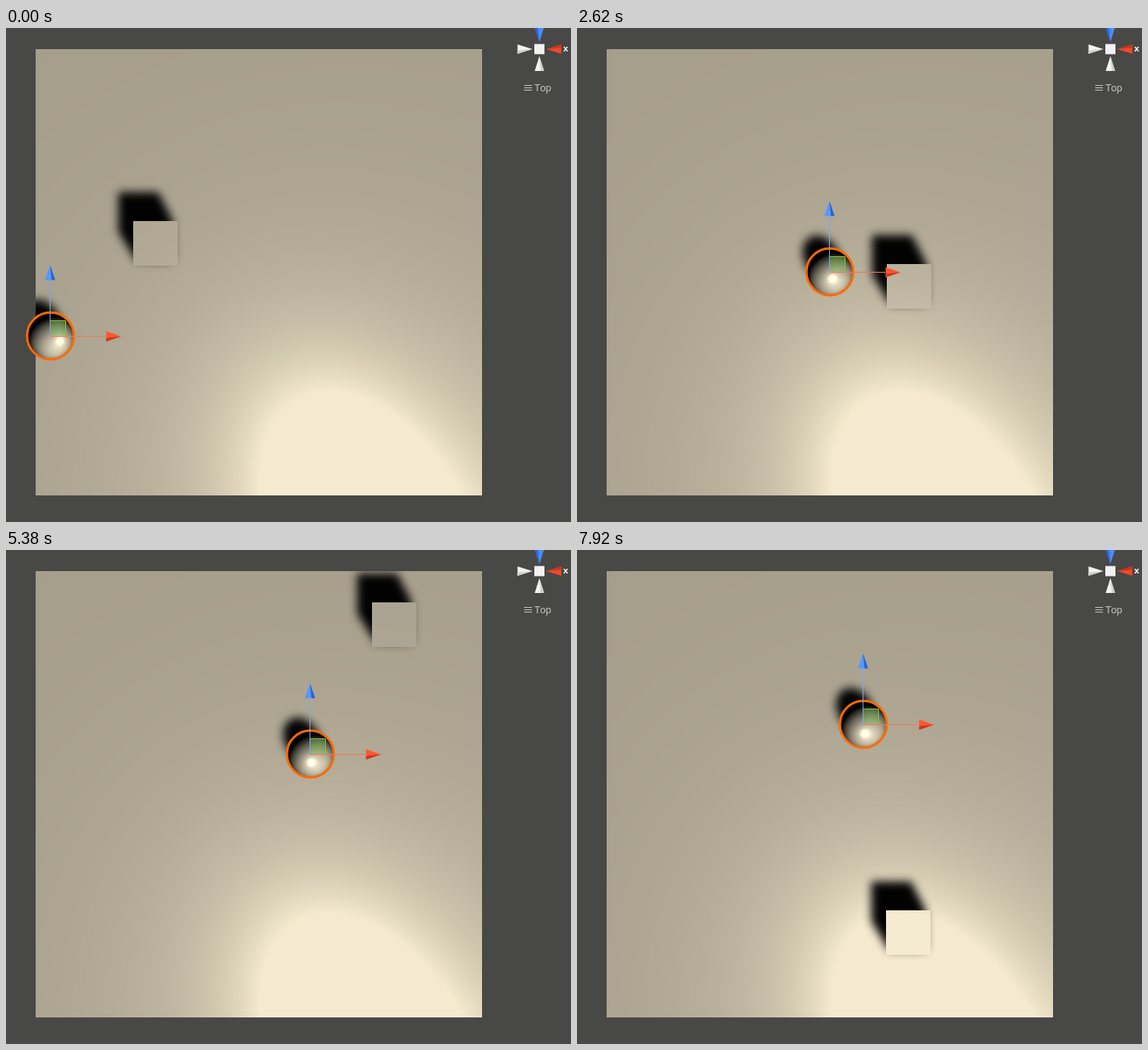
An HTML page with a canvas that plays this animation: 724x632 px, repeating every 8000 ms.

```html
<!DOCTYPE html>
<html lang="en">
<head>
<meta charset="utf-8">
<title>Rolling ball</title>
<style>
  html, body { margin: 0; width: 100%; height: 100%; overflow: hidden; background: #484846; }
  canvas { display: block; }
</style>
</head>
<body>
<canvas id="stage" width="724" height="632"></canvas>
<script>
const ctx = document.getElementById('stage').getContext('2d');
const LOOP = 8000, STEP = 76.9, LAST_STEP = 103;
const PLANE = { x: 38, y: 27, w: 572, h: 571 };
const CUBE = 57, RADIUS = 29;
const LIGHT = [0.321, 0.557, 0.766];          // screen x, screen y, towards the viewer
const EYE = { x: 280, y: 316, height: 420 };
const TINT = [1, 0.957, 0.843];
const AMBIENT = 159;

// Way points [step, x, y]; after each roll the ball has fallen off and is put back to the centre.
const ROLLS = [
  [[0, 57, 394], [8, 2, 400]],
  [[8, 324, 312], [13, 291, 343], [22, 160, 342], [26, 88, 323], [34, -18, 340]],
  [[34, 324, 312], [42, 344, 273], [51, 375, 241], [58, 363, 240], [69, 386, 262],
   [80, 445, 225], [89, 457, 148], [103, 367, 223], [104, 366, 230]]
];
// The cube jumps whenever it is reached or the ball falls: [step, left, top]
const JUMPS = [[0, 163, 247], [8, 199, 375], [14, 71, 190],
               [34, 397, 302], [69, 469, 67], [85, 396, 461]];

const clamp01 = v => Math.min(1, Math.max(0, v));
const dot = (a, b) => a.reduce((sum, c, i) => sum + c * b[i], 0);
const unit = v => v.map(c => c / Math.hypot(...v));

// Brightness with a highlight; k is the squared cosine between normal and half vector
const gloss = k => Math.min(245, AMBIENT + 2.85 / (1.013 - k));

function halfVector(x, y) {
  const view = unit([EYE.x - x, EYE.y - y, EYE.height]);
  return unit(view.map((c, i) => c + LIGHT[i]));
}

function makeLayer(w, h) {
  const canvas = document.createElement('canvas');
  Object.assign(canvas, { width: w, height: h });
  return canvas;
}

function paint(layer, brightness) {
  const { width: w, height: h } = layer, c = layer.getContext('2d');
  const image = c.createImageData(w, h);
  for (let i = 0; i < w * h; i++) {
    const value = brightness(i % w, Math.floor(i / w));
    if (value === null) continue;
    TINT.forEach((f, j) => image.data[i * 4 + j] = value * f);
    image.data[i * 4 + 3] = 255;
  }
  c.putImageData(image, 0, 0);
}

const ground = makeLayer(PLANE.w, PLANE.h);
paint(ground, (x, y) => gloss(halfVector(x + PLANE.x, y + PLANE.y)[2] ** 2));
const ball = makeLayer(60, 60);

// Smooth curve through the way points of the current roll
function ballAt(step) {
  const roll = ROLLS.find(r => step < r.at(-1)[0]);
  const i = roll.findIndex(p => p[0] > step) - 1;
  const a = roll[i], b = roll[i + 1], span = b[0] - a[0], u = (step - a[0]) / span;
  const slope = (n, axis) => {
    const p = roll[Math.max(0, n - 1)], q = roll[Math.min(roll.length - 1, n + 1)];
    return (q[axis] - p[axis]) / (q[0] - p[0]) * span;
  };
  return [1, 2].map(axis => Math.round(
    a[axis] * (1 + 2 * u) * (1 - u) ** 2 + slope(i, axis) * u * (1 - u) ** 2 +
    b[axis] * u * u * (3 - 2 * u) + slope(i + 1, axis) * u * u * (u - 1)));
}

function trace(points) {
  ctx.beginPath();
  points.forEach(p => ctx.lineTo(...p));
}

function polygon(color, points) {
  ctx.fillStyle = color;
  trace(points);
  ctx.fill();
}

function line(color, ...points) {
  ctx.strokeStyle = color;
  ctx.lineWidth = 1;
  trace(points);
  ctx.stroke();
}

// Cone with its tip at x, y; its base lies below before turning
function cone(x, y, angle, half, length, light, dark) {
  ctx.save();
  ctx.translate(x, y);
  ctx.rotate(angle);
  polygon(light, [[0, 0], [-half, length], [half, length]]);
  polygon(dark, [[0, 0], [half * 0.3, length], [half, length]]);
  ctx.restore();
}

function drawShadows(cubeX, cubeY, x, y) {
  const near = CUBE - 6, left = cubeX - 19, top = cubeY - 37;
  ctx.save();
  ctx.beginPath();
  ctx.rect(PLANE.x, PLANE.y, PLANE.w, PLANE.h);
  ctx.clip();
  ctx.filter = 'blur(6px)';
  polygon('#020202', [[left, top], [left + near, top], [cubeX + near, cubeY],
    [cubeX + near, cubeY + near], [cubeX + 4, cubeY + near], [left, top + near]]);
  ctx.beginPath();
  ctx.ellipse(x - 11, y - 19, 29, 22, Math.PI / 3, 0, 7);
  ctx.fill();
  ctx.restore();
}

function drawCube(x, y) {
  ctx.drawImage(ground, x - PLANE.x, y - PLANE.y, CUBE, CUBE, x, y, CUBE, CUBE);
  ctx.fillStyle = 'rgba(255,250,228,.03)';
  ctx.fillRect(x, y, CUBE, CUBE);
}

function drawBall(x, y) {
  const half = halfVector(x, y);
  paint(ball, (px, py) => {
    const nx = (px - 29.5) / RADIUS, ny = (py - 29.5) / RADIUS, r2 = nx * nx + ny * ny;
    if (r2 > 1) return null;
    const normal = [nx, ny, Math.sqrt(1 - r2)];
    const lit = clamp01(dot(normal, LIGHT));
    const shine = gloss(clamp01(dot(normal, half)) ** 2) - AMBIENT;
    return AMBIENT * lit / LIGHT[2] + shine * clamp01(lit * 2);
  });
  ctx.drawImage(ball, x - 30, y - 30);
  ctx.strokeStyle = '#ff6a00';
  ctx.lineWidth = 3;
  ctx.beginPath();
  ctx.arc(x, y, 30, 0, 7);
  ctx.stroke();
}

function drawHandles(x, y) {
  ctx.fillStyle = 'rgba(120,190,80,.4)';
  ctx.fillRect(x, y - 20, 20, 20);
  line('#86c440', [x, y - 20], [x + 20, y - 20], [x + 20, y]);
  line('#78a8ee', [x, y], [x, y - 72]);
  line('#f0795a', [x, y], [x + 72, y]);
  cone(x, y - 91, 0, 6.5, 19, '#5598ff', '#2d62c4');
  cone(x + 91, y, Math.PI / 2, 6.5, 19, '#ff5530', '#c8381c');
}

function drawCompass() {
  const x = 683.5, y = 27, quarter = Math.PI / 2;
  const sides = [['#f2f2f2', '#cfcfcf'], ['#f2482a', '#c9361c'],
                 ['#4a8cff', '#2f68d8'], ['#f2f2f2', '#cfcfcf']];
  const turns = [0, -1, 2, 1];
  sides.forEach((colors, i) => {
    const angle = turns[i] * quarter;
    cone(x - 9 * Math.sin(angle), y + 9 * Math.cos(angle), angle, 6, 19, ...colors);
  });
  ctx.fillStyle = '#f2f2f2';
  ctx.fillRect(x - 6.5, y - 6.5, 13, 13);
  ctx.font = 'bold 11px "Open Sans", sans-serif';
  ctx.fillText('x', 714, 30);
  ctx.fillStyle = '#c2c2c2';
  ctx.font = '13px Roboto, sans-serif';
  ctx.fillText('Top', 677, 81);
  for (let i = 0; i < 3; i++) ctx.fillRect(664, 73 + 3 * i, 10, 1);
}

function frame(now) {
  const step = Math.min(LAST_STEP, Math.floor(now % LOOP / STEP + 0.05));
  const [x, y] = ballAt(step);
  const [, cubeX, cubeY] = JUMPS.findLast(j => j[0] <= step);
  ctx.fillStyle = '#484846';
  ctx.fillRect(0, 0, 724, 632);
  ctx.drawImage(ground, PLANE.x, PLANE.y);
  drawShadows(cubeX, cubeY, x, y);
  drawCube(cubeX, cubeY);
  drawBall(x, y);
  drawHandles(x - 0.5, y + 0.5);
  drawCompass();
}

let start;
function tick(now) {
  start ??= now;
  frame(now - start);
  requestAnimationFrame(tick);
}
frame(0);
requestAnimationFrame(tick);
</script>
</body>
</html>
```
